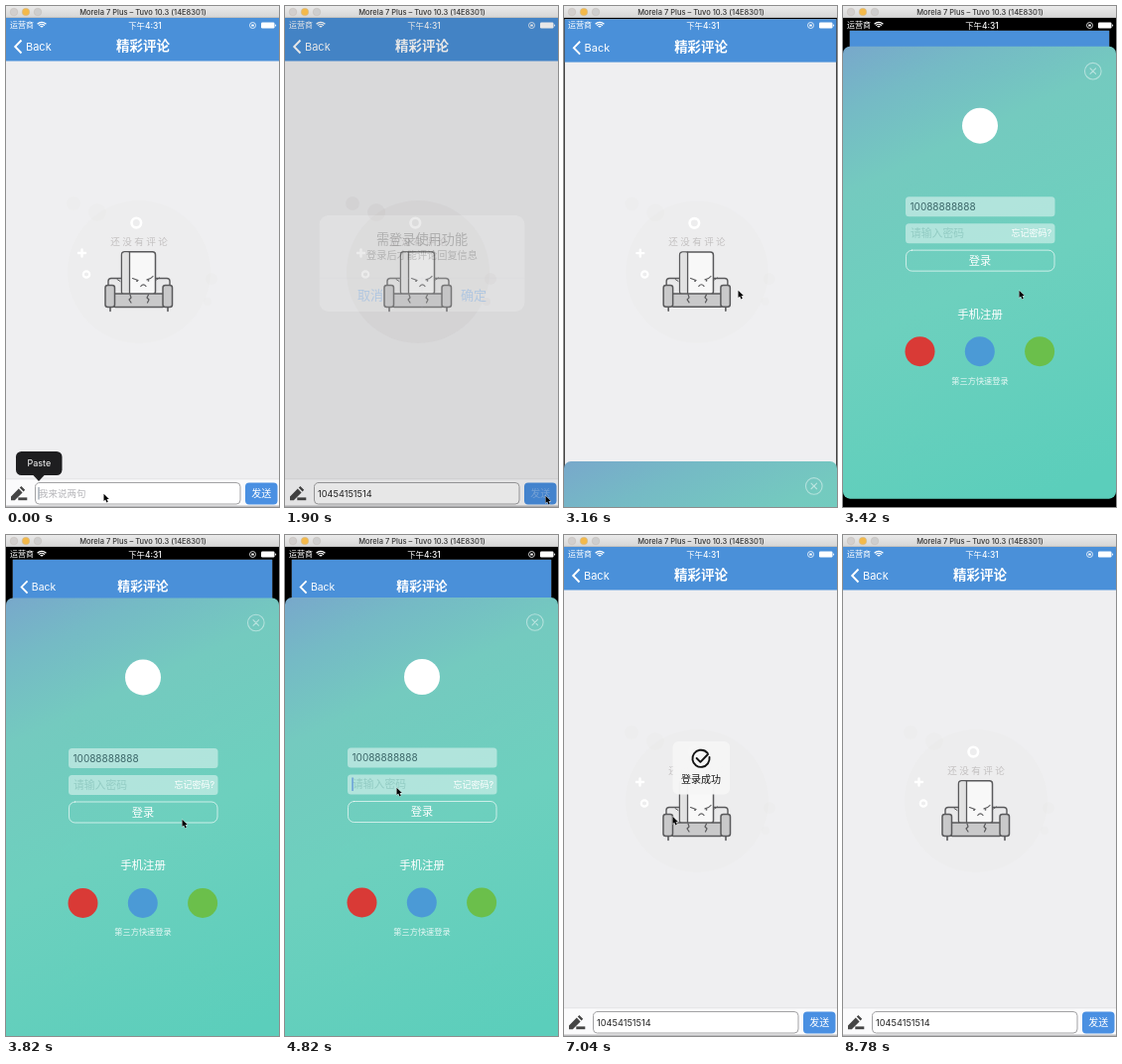
An HTML page with a canvas that plays this animation: 275x505 px, repeating every 8.84 s.

```html
<!DOCTYPE html>
<html lang="zh">
<head>
<meta charset="utf-8">
<title>Login to comment</title>
<style>
html, body { margin: 0; width: 100%; height: 100%; overflow: hidden; background: #000; }
canvas { display: block; width: 275px; height: 505px; }
</style>
</head>
<body>
<canvas id="stage"></canvas>
<script>
const W = 275, H = 505, LOOP = 8840;
const FONT = 'Inter, "Noto Sans CJK SC", "Noto Sans CJK", sans-serif';
const BLUE = '#4a90d9', INK = '#59595b';
const COMMENT = '10454151514', PHONE = '10088888888';

const canvas = document.getElementById('stage');
const ratio = window.devicePixelRatio || 1;
canvas.width = W * ratio;
canvas.height = H * ratio;
const ctx = canvas.getContext('2d');

const clamp = v => Math.max(0, Math.min(1, v));
const lerp = (a, b, p) => a + (b - a) * p;
const ramp = (t, from, to) => clamp((t - from) / (to - from));
const easeOut = p => 1 - (1 - p) * (1 - p);
const easeInOut = p => p * p * (3 - 2 * p);

// time, x, y of the pointer's tip
const POINTER = [
  [0, 98, 491], [1250, 98, 491], [1780, 262, 493], [2100, 262, 493],
  [2650, 175, 286], [3200, 175, 286], [3420, 177, 286], [3900, 177, 286],
  [4500, 112, 254], [5950, 112, 254], [6250, 109, 283], [7500, 109, 283],
  [8120, 96, 512], [LOOP, 96, 512]
];

function paint(shape, fill, stroke, line) {
  if (fill) { ctx.fillStyle = fill; ctx.fill(shape); }
  if (stroke) { ctx.strokeStyle = stroke; ctx.lineWidth = line; ctx.stroke(shape); }
}

function box(x, y, w, h, r, fill, stroke, line = 1) {
  const p = new Path2D();
  p.roundRect(x, y, w, h, r);
  paint(p, fill, stroke, line);
}

function disc(x, y, r, fill, stroke, line = 1) {
  const p = new Path2D();
  p.arc(x, y, r, 0, Math.PI * 2);
  paint(p, fill, stroke, line);
}

function path(d, stroke, line = 1, fill) {
  paint(new Path2D(d), fill, stroke, line);
}

function text(str, x, y, size, color, align = 'left', weight = 400) {
  ctx.font = `${weight} ${size}px ${FONT}`;
  ctx.textAlign = align;
  ctx.textBaseline = 'alphabetic';
  ctx.fillStyle = color;
  ctx.fillText(str, x, y + size * 0.36);
}

function textWidth(str, size) {
  ctx.font = `400 ${size}px ${FONT}`;
  return ctx.measureText(str).width;
}

function titleBar() {
  const g = ctx.createLinearGradient(0, 0, 0, 12);
  g.addColorStop(0, '#ebebeb');
  g.addColorStop(1, '#d5d5d5');
  ctx.fillStyle = g;
  ctx.fillRect(0, 0, W, 12);
  ctx.fillStyle = '#a9a9a9';
  ctx.fillRect(0, 11.5, W, 0.5);
  ['#d2cfce', '#f4b94a', '#cecece'].forEach((c, i) => disc(8 + i * 12, 6, 3.8, c, '#bdb7ae', 0.4));
  text('Morela 7 Plus – Tuvo 10.3 (14E8301)', 138, 6.2, 7.5, '#333', 'center', 500);
}

function statusBar() {
  text('运营商', 4, 19.5, 8, '#fff');
  ctx.lineCap = 'butt';
  [1.8, 3.9, 6].forEach(r => {
    ctx.beginPath();
    ctx.arc(36, 22.3, r, -Math.PI * 0.76, -Math.PI * 0.24);
    ctx.strokeStyle = '#fff';
    ctx.lineWidth = 1.3;
    ctx.stroke();
  });
  text('下午4:31', 140, 19.5, 8.4, '#fff', 'center', 500);
  disc(248.5, 19.5, 3, null, '#fff', 0.8);
  box(247.2, 18.6, 2.6, 2, 0.4, '#fff');
  box(257, 16.5, 13.5, 6, 1.2, '#fff');
  box(271.1, 18.4, 1, 2.2, 0.5, '#fff');
}

function sofaScene(dim) {
  const haze = `rgba(140,125,95,${0.015 + dim * 0.16})`;
  disc(134, 268, 72, haze);
  [[68, 199, 7], [92, 208, 9], [207, 275, 6], [203, 298, 4]].forEach(([x, y, r]) => disc(x, y, r, haze));
  disc(131.3, 218.6, 4.8, null, '#fff', 2.6);
  disc(81, 270.5, 3.2, null, '#fff', 2.2);
  ctx.lineCap = 'round';
  path('M76.5 245.5v7M73 249h7', '#fff', 2.4);
  [...'还没有评论'].forEach((c, i) => text(c, 110 + i * 12, 237.3, 9.6, '#c3c0c0', 'center', 300));

  ctx.lineJoin = 'round';
  box(103, 274.5, 62, 20, 3, '#e9e9ea', INK, 1.4);
  box(116.5, 247.8, 34, 43, 3, '#f8f8f8', INK, 1.5);
  box(117.2, 248.5, 7, 41.5, 2, '#e2e2e2');
  path('M124.5 248v42', INK, 1.3);
  box(109, 290, 50, 13.5, 1, '#c9c9ca', INK, 1.5);
  box(100, 281.5, 9.5, 22, 2.5, '#c9c9ca', INK, 1.5);
  box(158, 281.5, 9.5, 22, 2.5, '#c9c9ca', INK, 1.5);
  path('M105 304v3.5M163 304v3.5', INK, 1.6);
  path('M125 291l1 3-2 2 2 3M143.5 291l-1.5 3 2 2-1.5 3', INK, 1.2);
  path('M127.5 274.5l5.5 2M148 272.5q-2 2.7-6 3.3M135.8 282.5q2.6-3.4 5.2 0', INK, 1.2);
  disc(132, 277.2, 0.9, INK);
  disc(143.5, 276.8, 0.9, INK);
  path('M112 275.5l3 2M151.5 276l3-2', INK, 1);
}

function commentBar(t) {
  ctx.fillStyle = '#fbfbfc';
  ctx.fillRect(0, 477, W, 28);
  ctx.fillStyle = '#d8d8da';
  ctx.fillRect(0, 476.6, W, 0.6);
  path('M5 498.2v-3.8l7.8-7.8 3.8 3.8-7.8 7.8zM13.8 485.6l1.6-1.6 3.8 3.8-1.6 1.6z', null, 0, '#454545');
  ctx.fillStyle = '#454545';
  ctx.fillRect(12.3, 495.4, 9, 2.8);
  box(29.5, 480.5, 206.5, 21.5, 4, '#fff', '#a2a2a4', 1);

  const typed = Math.floor(ramp(t, 120, 1120) * COMMENT.length);
  const value = COMMENT.slice(0, typed);
  if (value) text(value, 33, 491.5, 9.2, '#222');
  else text('我来说两句', 33, 491.5, 9.5, '#b4b4b8');
  if (t < 1850) {
    ctx.fillStyle = typed ? BLUE : '#7c8796';
    ctx.fillRect(32.5 + (value ? textWidth(value, 9.2) + 1 : 0), 485, 1, 12.5);
  }

  const pressed = t > 1800 && t < 2020;
  box(241, 480.5, 32.5, 22, 4, '#4a90e2');
  text('发送', 257.3, 491.5, 10, pressed ? 'rgba(255,255,255,.3)' : '#fff', 'center');
  ctx.fillStyle = '#bdbdc0';
  ctx.fillRect(0, 503.5, W, 1.5);
}

function pasteBubble() {
  box(10, 449, 46.5, 24, 5.5, '#1e1e20');
  path('M27 472.5h12l-6 6.5z', null, 0, '#1e1e20');
  text('Paste', 33.3, 461.2, 9, '#fff', 'center');
}

function page(t, dim) {
  ctx.fillStyle = '#efeff1';
  ctx.fillRect(0, 12, W, H - 12);
  ctx.fillStyle = BLUE;
  ctx.fillRect(0, 12, W, 43.5);
  ctx.lineCap = 'butt';
  ctx.lineJoin = 'miter';
  path('M15.5 34.5l-6.3 6.5 6.3 6.5', '#fff', 1.9);
  text('Back', 20, 41, 11, '#fff');
  text('精彩评论', 138, 40.3, 13.5, '#fff', 'center', 700);
  sofaScene(dim);
  commentBar(t);
}

function alertBox(t, shown) {
  const s = t < 2600 ? 1.2 - 0.2 * shown : 1;
  ctx.save();
  ctx.globalAlpha = shown;
  ctx.translate(138, 259.5);
  ctx.scale(s, s);
  box(-89.5, -42, 179, 84, 8, 'rgba(249,249,249,.96)');
  text('需登录使用功能', 0, -21, 11.4, '#111', 'center', 500);
  text('登录后才能评论回复信息', 0, -7, 8.8, '#222', 'center');
  ctx.fillStyle = '#d0d0d4';
  ctx.fillRect(-89.5, 12.5, 179, 0.5);
  ctx.fillRect(-0.25, 12.5, 0.5, 29.5);
  text('取消', -45, 27.5, 11.3, '#1a7df0', 'center');
  text('确定', 45, 27.5, 11.3, '#1a7df0', 'center');
  ctx.restore();
}

// 0 = below the screen, 1 = at rest; rises on an underdamped spring
function sheetPos(t) {
  if (t < 3126 || t > 6720) return 0;
  if (t > 6400) return 1 - easeInOut(ramp(t, 6400, 6720));
  const s = (t - 3126) / 1000, wd = Math.PI / 0.294, k = 10.15;
  return 1 - Math.exp(-k * s) * (Math.cos(wd * s) + k / wd * Math.sin(wd * s));
}

function loginSheet(t, pos) {
  ctx.save();
  ctx.translate(0, lerp(505, 63, pos));
  const g = ctx.createLinearGradient(0, 0, 211, 453);
  g.addColorStop(0, '#78a8cb');
  g.addColorStop(0.12, '#75bac5');
  g.addColorStop(0.27, '#74cabf');
  g.addColorStop(0.55, '#6dd0be');
  g.addColorStop(1, '#5bcebb');
  box(0, 0, W, 456, 7, g);
  disc(251.8, 25, 8.3, null, 'rgba(255,255,255,.45)', 1.1);
  ctx.lineCap = 'round';
  path('M249 22.2l5.6 5.6m0-5.6l-5.6 5.6', 'rgba(255,255,255,.5)', 1.1);

  disc(138, 80, 18, '#fff');

  box(63, 151.5, 150.5, 20, 3.5, 'rgba(255,255,255,.45)');
  text(PHONE, 67.5, 161.5, 10, '#3b6668');
  box(63, 178.5, 150.5, 20, 3.5, 'rgba(255,255,255,.45)');
  const typed = Math.floor(ramp(t, 4980, 5850) * 8);
  if (typed) for (let i = 0; i < typed; i++) disc(70.5 + i * 6.4, 188.5, 2, '#3b6668');
  else text('请输入密码', 68, 188.5, 10.8, '#92cbc3');
  if (t > 4560 && t < 6300) {
    ctx.fillStyle = '#4d83d6';
    ctx.fillRect(67.5 + typed * 6.4, 181.5, 1.1, 13.5);
  }
  text('忘记密码?', 210, 188.5, 9, '#fff', 'right');

  box(63.5, 205.5, 149.5, 21, 6, null, 'rgba(255,255,255,.65)', 1);
  const pressed = t > 6270 && t < 6400;
  text('登录', 138, 216.3, 11.2, pressed ? 'rgba(255,255,255,.4)' : '#fff', 'center');
  text('手机注册', 138, 269.8, 11.4, '#fff', 'center');
  ['#d93a36', '#4b9ad6', '#6bbf4b'].forEach((c, i) => disc(77.5 + i * 60.3, 307.5, 15, c));
  text('第三方快速登录', 138, 337, 8.2, 'rgba(255,255,255,.85)', 'center');
  ctx.restore();
}

function successHud(shown) {
  ctx.save();
  ctx.globalAlpha = shown;
  box(109.5, 208, 57.5, 53.5, 6, 'rgba(246,246,246,.97)');
  ctx.lineCap = 'round';
  ctx.lineJoin = 'round';
  ctx.beginPath();
  ctx.arc(138, 225.3, 8.6, -0.15, Math.PI * 1.78);
  ctx.strokeStyle = '#111';
  ctx.lineWidth = 1.9;
  ctx.stroke();
  path('M133.6 225l3.8 3.8 7.6-7.8', '#111', 1.9);
  text('登录成功', 138, 246.3, 10, '#111', 'center');
  ctx.restore();
}

function pointer(t) {
  let i = 0;
  while (i < POINTER.length - 2 && t >= POINTER[i + 1][0]) i++;
  const [t0, x0, y0] = POINTER[i], [t1, x1, y1] = POINTER[i + 1];
  const p = easeInOut(ramp(t, t0, t1));
  const arrow = 'M0 0v8.6l2-1.8 1.4 3.3 1.6-.7-1.4-3.2h2.7z';
  ctx.save();
  ctx.translate(lerp(x0, x1, p) + 0.5, lerp(y0, y1, p) + 0.8);
  ctx.scale(0.85, 0.85);
  ctx.lineJoin = 'miter';
  path(arrow, 'rgba(255,255,255,.8)', 1);
  path(arrow, null, 0, '#000');
  ctx.restore();
}

function draw(t) {
  ctx.setTransform(ratio, 0, 0, ratio, 0, 0);
  ctx.fillStyle = '#000';
  ctx.fillRect(0, 0, W, H);

  const alert = easeOut(ramp(t, 1877, 2080)) * (1 - ramp(t, 2830, 3030));
  const pos = sheetPos(t);
  const scale = 1 - 0.05 * clamp(pos);

  ctx.save();
  ctx.translate(137.5, 270);
  ctx.scale(scale, scale);
  ctx.translate(-137.5, -270);
  page(t, alert);
  ctx.restore();

  // the status strip stays in place while the page is pushed back
  statusBar();
  if (t < 120) pasteBubble();
  if (alert > 0) {
    ctx.fillStyle = `rgba(0,0,0,${0.43 * alert})`;
    ctx.fillRect(0, 12, W, H - 12);
    alertBox(t, alert);
  }
  if (pos > 0) loginSheet(t, pos);
  const hud = ramp(t, 6760, 6880) * (1 - ramp(t, 7820, 8040));
  if (hud > 0) successHud(hud);
  titleBar();
  pointer(t);
}

const start = performance.now();
function tick() {
  draw((performance.now() - start) % LOOP);
  requestAnimationFrame(tick);
}
tick();
</script>
</body>
</html>
```
